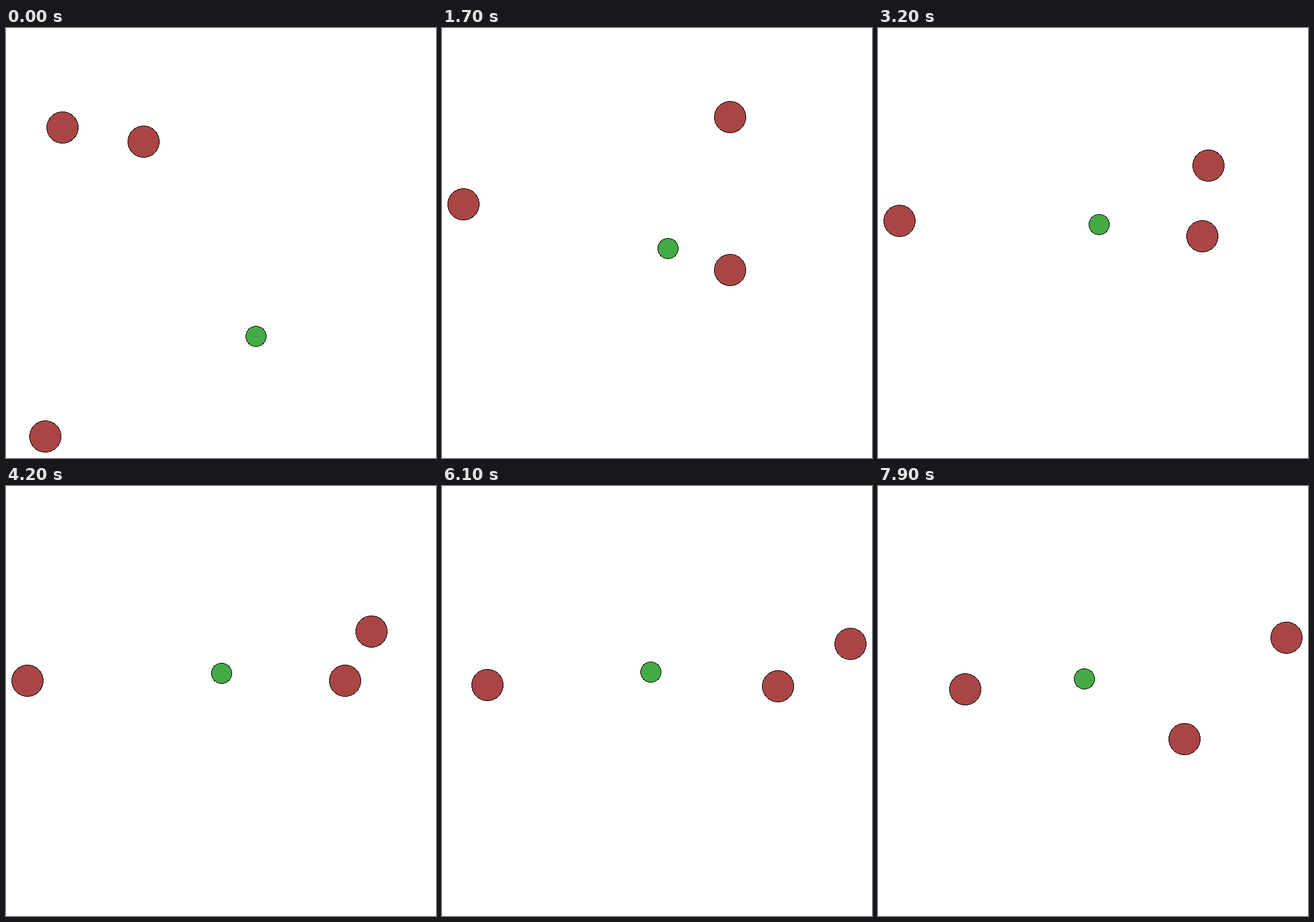
Write an HTML page with a canvas that moves like this. It is 700x700 px and loops after 8000 ms.

```html
<!DOCTYPE html>
<html lang="en">
<head>
<meta charset="utf-8">
<title>Drifting circles</title>
<style>
  html, body { margin: 0; width: 100%; height: 100%; overflow: hidden; background: #fff; }
  canvas { display: block; }
</style>
</head>
<body>
<canvas id="stage" width="700" height="700"></canvas>
<script>
const ctx = document.getElementById('stage').getContext('2d');
const SIZE = 700, MARGIN = 35, STEP = 100, LOOP = 8000;
const RED = '#aa4545', GREEN = '#45aa45';

// Every circle passes its key points at these steps; the walls stop it in between.
const KEY_STEPS = [1, 9, 17, 32, 53, 70, 79];
const circles = [
  { color: RED, radius: 26,
    x: [64, 356, 469, 528, 566, 515, 499], y: [665, 516, 394, 339, 305, 370, 412] },
  { color: RED, radius: 26,
    x: [92, -40, -40, -40, 35, 116, 142], y: [162, 243, 287, 314, 320, 328, 331] },
  { color: RED, radius: 26,
    x: [224, 420, 469, 538, 662, 760, 760], y: [185, 127, 145, 224, 247, 264, 247] },
  { color: GREEN, radius: 17,
    x: [407, 382, 368, 360, 342, 338, 336], y: [502, 429, 359, 320, 297, 312, 314] }
];

const slope = (values, i) => (values[i + 1] - values[i]) / (KEY_STEPS[i + 1] - KEY_STEPS[i]);

// Harmonic mean of the neighbouring slopes, so the curve never overshoots a key point.
function tangent(values, i) {
  const last = values.length - 1;
  if (i === 0) return 1.5 * slope(values, 0) - 0.5 * tangent(values, 1);
  if (i === last) return 1.5 * slope(values, last - 1) - 0.5 * tangent(values, last - 1);
  const before = slope(values, i - 1), after = slope(values, i);
  return before * after <= 0 ? 0 : 2 * before * after / (before + after);
}

function position(values, step) {
  const i = Math.max(0, KEY_STEPS.findIndex(key => key >= step) - 1);
  const span = KEY_STEPS[i + 1] - KEY_STEPS[i];
  const u = Math.max(0, step - KEY_STEPS[i]) / span, w = 1 - u;
  const value = values[i] * (1 + 2 * u) * w * w + values[i + 1] * u * u * (3 - 2 * u)
    + span * u * w * (tangent(values, i) * w - tangent(values, i + 1) * u);
  return Math.round(Math.min(SIZE - MARGIN, Math.max(MARGIN, value)));
}

// Filled row by row to keep hard pixel edges.
function disc(x, y, radius, color) {
  ctx.fillStyle = color;
  for (let row = -radius; row < radius; row++) {
    const half = Math.round(Math.sqrt(radius ** 2 - (row + 0.5) ** 2));
    ctx.fillRect(x - half, y + row, 2 * half, 1);
  }
}

function draw() {
  const step = Math.max(1, Math.floor(performance.now() % LOOP / STEP));
  ctx.clearRect(0, 0, SIZE, SIZE);
  for (const circle of circles) {
    const x = position(circle.x, step), y = position(circle.y, step);
    disc(x, y, circle.radius, '#000');
    disc(x, y, circle.radius - 1, circle.color);
  }
  requestAnimationFrame(draw);
}
draw();
</script>
</body>
</html>
```
